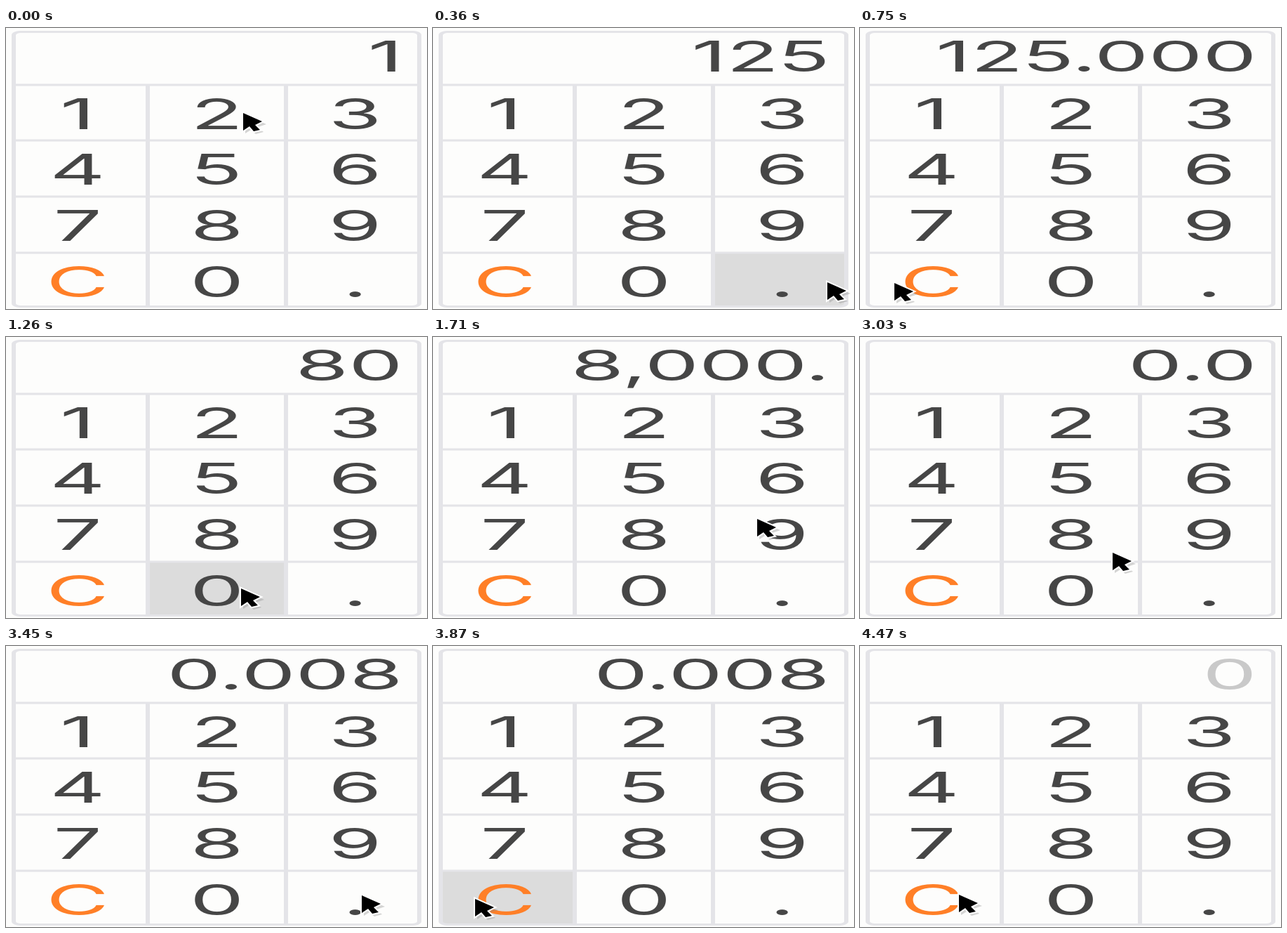
Animation, 600 px wide and 400 px high, one loop 4590 ms. Source, as an HTML page:

```html
<!DOCTYPE html>
<html lang="en">
<head>
<meta charset="utf-8">
<title>Calculator keypad</title>
<style>
  html, body { margin: 0; width: 100%; height: 100%; overflow: hidden; background: #fdfdfc; }
  svg { display: block; width: 100vw; height: 100vh; }
  text { font: 400 60px Inter, Roboto, sans-serif; fill: #464646; }
  .clear { fill: #ff7f27; }
  .zero { fill: #c9c9c9; }
  .line { fill: #e4e4e8; }
</style>
</head>
<body>
<svg id="stage" viewBox="0 0 600 400" preserveAspectRatio="none">
  <rect id="flash" fill="#dcdcdc" visibility="hidden"/>
  <g id="grid"></g>
  <g id="keys"></g>
  <text id="value" text-anchor="end"></text>
  <g id="cursor">
    <path d="M3 3V29L11 24L18 30L29 27L21 20L33 16Z" fill="#888" opacity=".35"/>
    <path d="M0 0V25L9 19L15 26L24 24L17 17L27 12Z" fill="#000" stroke="#fff" stroke-width="4" paint-order="stroke"/>
  </g>
</svg>
<script>
const LOOP = 4590, STEP = 30, HOLD = 60, STRETCH = 2.04;
const COLS = [102, 300.5, 497.5], BASES = [143.5, 223, 303, 383];
const EDGES_X = [14, 202, 399, 586], EDGES_Y = [81, 160, 240, 320, 395];
const LABELS = '123456789C0.';

// time, x, y, key pressed there (if any)
const MOVES = [
  [0, 338, 121],
  [30, 338, 121, '2'],
  [180, 342, 205, '5'],
  [330, 562, 362, '.'],
  [450, 335, 358, '0'],
  [540, 335, 358, '0'],
  [630, 335, 358, '0'],
  [750, 49, 363],
  [780, 49, 363, 'C'],
  [990, 330, 285, '8'],
  [1140, 335, 358, '0'],
  [1260, 335, 358, '0'],
  [1380, 335, 358, '0'],
  [1530, 520, 358, '.'],
  [1710, 462, 259],
  [1800, 345, 207, '5'],
  [1920, 70, 358, 'C'],
  [2040, 105, 285, '7'],
  [2160, 110, 208, '4'],
  [2280, 348, 212, '5'],
  [2640, 50, 358, 'C'],
  [2820, 555, 360, '.'],
  [2940, 345, 350, '0'],
  [3030, 360, 307],
  [3120, 340, 355, '0'],
  [3240, 335, 285, '8'],
  [3360, 555, 340],
  [3450, 507, 355],
  [3750, 60, 360],
  [3840, 60, 360, 'C'],
  [4230, 141, 354]
];

const $ = id => document.getElementById(id);

function add(parent, tag, attrs, text) {
  const el = document.createElementNS('http://www.w3.org/2000/svg', tag);
  for (const k in attrs) el.setAttribute(k, attrs[k]);
  if (text) el.textContent = text;
  parent.append(el);
}

function place(x, y) {
  return `translate(${x} ${y}) scale(${STRETCH} 1)`;
}

function build() {
  const grid = $('grid');
  // frame ring: outer and inner rounded boxes
  const box = (x, y, w, h, rx, ry) =>
    `M${x + rx} ${y}h${w - 2 * rx}a${rx} ${ry} 0 0 1 ${rx} ${ry}v${h - 2 * ry}` +
    `a${rx} ${ry} 0 0 1 ${-rx} ${ry}h${2 * rx - w}a${rx} ${ry} 0 0 1 ${-rx} ${-ry}` +
    `v${2 * ry - h}a${rx} ${ry} 0 0 1 ${rx} ${-ry}z`;
  add(grid, 'path', {
    d: box(8, 4, 584, 394, 12, 6) + box(14, 7, 572, 388, 7, 3),
    class: 'line', 'fill-rule': 'evenodd'
  });
  for (const y of EDGES_Y.slice(0, 4))
    add(grid, 'rect', { x: 14, y: y - 1.5, width: 572, height: 3, class: 'line' });
  for (const x of EDGES_X.slice(1, 3))
    add(grid, 'rect', { x: x - 3, y: 82, width: 6, height: 313, class: 'line' });

  [...LABELS].forEach((c, i) => add($('keys'), 'text', {
    transform: place(COLS[i % 3], BASES[i / 3 | 0]),
    'text-anchor': 'middle',
    class: c === 'C' ? 'clear' : ''
  }, c));
  $('value').setAttribute('transform', place(565.5, 62));
}

function press(value, key) {
  if (key === 'C') return '0';
  if (key === '.') return value.includes('.') ? value : value + '.';
  return value === '0' ? key : value + key;
}

function valueAt(t) {
  return MOVES.reduce((v, [at, , , key]) => key && t >= at + HOLD ? press(v, key) : v, '1');
}

function format(value) {
  const [whole, part] = value.split('.');
  const grouped = whole.replace(/\B(?=(\d{3})+$)/g, ',');
  return part === undefined ? grouped : grouped + '.' + part;
}

function cursorAt(t) {
  let i = MOVES.length - 1;
  while (MOVES[i][0] > t) i--;
  const a = MOVES[i], b = MOVES[i + 1] || a;
  const start = a[0] + (a[3] ? HOLD : 0);
  const p = b[0] > start ? Math.max(0, (t - start) / (b[0] - start)) : 0;
  const e = p * p * (3 - 2 * p);
  return [a[1] + (b[1] - a[1]) * e, a[2] + (b[2] - a[2]) * e];
}

function showFlash(t) {
  const hit = MOVES.find(([at, , , key]) => key && t >= at && t < at + HOLD);
  const flash = $('flash');
  flash.setAttribute('visibility', hit ? 'visible' : 'hidden');
  if (!hit) return;
  const i = LABELS.indexOf(hit[3]), c = i % 3, r = i / 3 | 0;
  flash.setAttribute('x', EDGES_X[c]);
  flash.setAttribute('y', EDGES_Y[r]);
  flash.setAttribute('width', EDGES_X[c + 1] - EDGES_X[c]);
  flash.setAttribute('height', EDGES_Y[r + 1] - EDGES_Y[r]);
}

function draw(now) {
  const t = Math.floor(Math.max(0, now - origin) % LOOP / STEP) * STEP;
  const value = valueAt(t);
  $('value').textContent = format(value);
  $('value').setAttribute('class', value === '0' ? 'zero' : '');
  $('cursor').setAttribute('transform', `translate(${cursorAt(t)})`);
  showFlash(t);
  requestAnimationFrame(draw);
}

build();
const origin = performance.now();
draw(origin);
</script>
</body>
</html>
```
